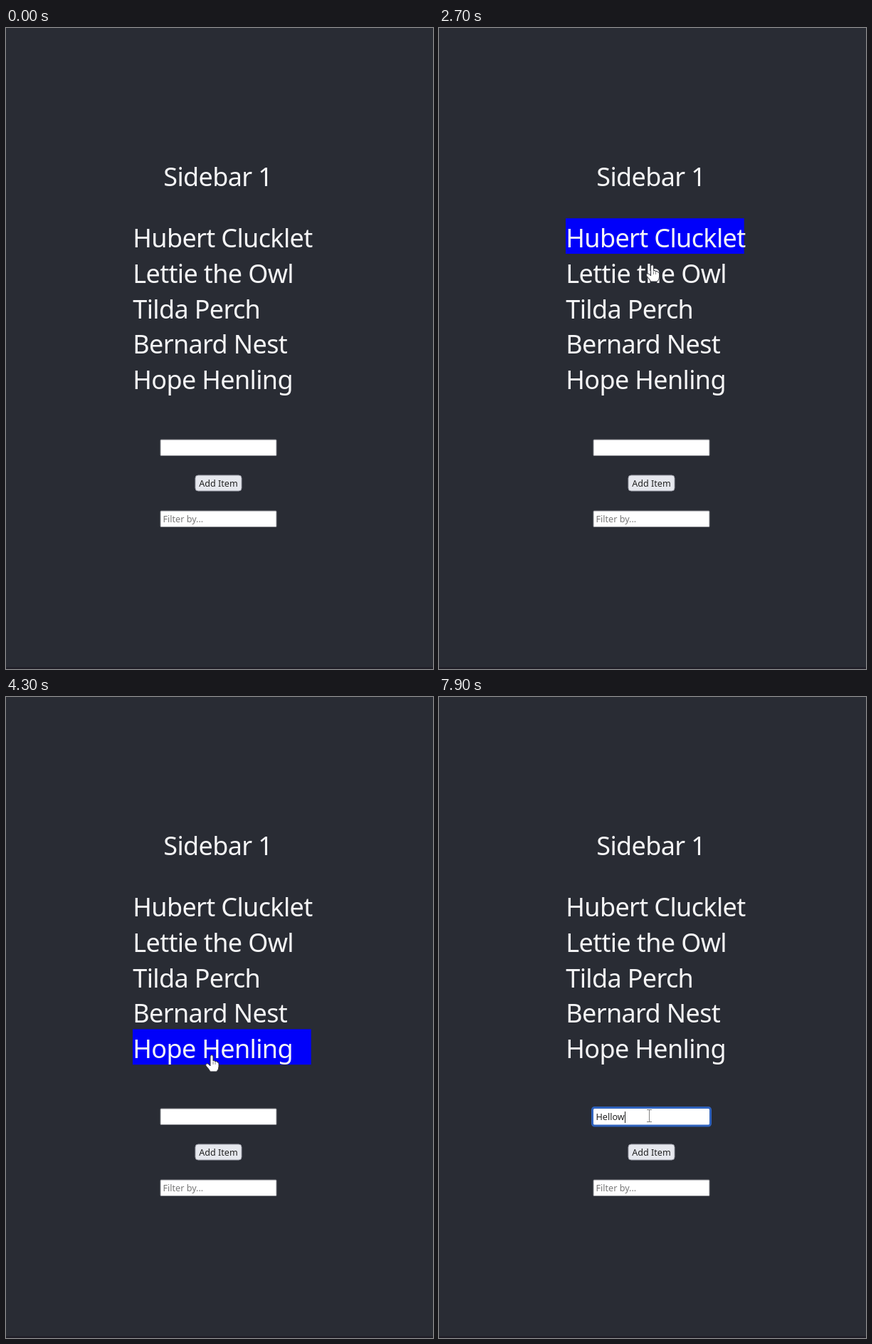
Write an HTML page with a canvas that moves like this. It is 600 by 900 pixels and loops after 8000 ms.

```html
<!DOCTYPE html>
<html lang="en">
<head>
<meta charset="utf-8">
<title>Sidebar</title>
<style>
  html, body { margin: 0; width: 100%; height: 100%; overflow: hidden; background: #292c34; }
  canvas { display: block; width: 600px; height: 900px; }
</style>
</head>
<body>
<canvas id="stage" width="600" height="900"></canvas>
<script>
const ctx = document.getElementById('stage').getContext('2d');
const LOOP = 8000, STEP = 100;
const FAMILY = '"Noto Sans", "Open Sans", sans-serif';
const NAMES = ['Hubert Clucklet', 'Lettie the Owl', 'Tilda Perch', 'Bernard Nest', 'Hope Henling'];
const LIST = { x: 178, y: 267.2, w: 250.7, row: 49.8 };
const FIELD = { x: 216.5, y: 577.5, w: 164, h: 23.5 };
const FOCUS_AT = 4900;
const WORD = 'Hellow', TYPE_AT = 6200, KEY_TIME = 260;

// turning points of the pointer: time, x, y
const PATH = [
  [1900, 20, 395], [2200, 258, 306], [2500, 300, 292], [3200, 298, 510],
  [3750, 313, 328], [4300, 289, 503], [4550, 287, 612], [4900, 285, 592],
  [6100, 285, 592], [6500, 296, 588]
];

const ease = k => (1 - Math.cos(Math.PI * k)) / 2;

function pointer(t) {
  if (t < PATH[0][0]) return null;
  const i = PATH.findIndex(p => p[0] > t);
  const [t1, x1, y1] = PATH.at(i);
  if (i < 0) return { x: x1, y: y1 };
  const [t0, x0, y0] = PATH[i - 1];
  const k = ease((t - t0) / (t1 - t0));
  return { x: x0 + (x1 - x0) * k, y: y0 + (y1 - y0) * k };
}

function rowAt(p) {
  if (!p || p.x < LIST.x || p.x > LIST.x + LIST.w) return -1;
  const i = Math.floor((p.y - LIST.y) / LIST.row);
  return i >= 0 && i < NAMES.length ? i : -1;
}

function inField(p) {
  return p.x > FIELD.x && p.x < FIELD.x + FIELD.w && p.y > FIELD.y && p.y < FIELD.y + FIELD.h;
}

function text(str, x, y, size, color, tracking = 0) {
  ctx.font = size + 'px ' + FAMILY;
  ctx.letterSpacing = tracking + 'px';
  ctx.fillStyle = color;
  ctx.fillText(str, x, y);
}

const bigText = (str, x, y) => text(str, x, y, 36, '#f5f5f6', -0.65);
const smallText = (str, y, color, x = 220.5) => text(str, x, y, 12.6, color);

function box(x, y, w, h, r, fill, stroke, line = 1) {
  ctx.beginPath();
  ctx.roundRect(x + line / 2, y + line / 2, w - line, h - line, r);
  ctx.fillStyle = fill;
  ctx.fill();
  ctx.strokeStyle = stroke;
  ctx.lineWidth = line;
  ctx.stroke();
}

function inputBox(y) {
  box(FIELD.x, y, FIELD.w, FIELD.h, 1, '#fff', '#85868c');
}

function shape(p, d, stroke) {
  const path = new Path2D(d);
  ctx.save();
  ctx.translate(p.x, p.y);
  ctx.lineWidth = 1;
  ctx.lineJoin = 'round';
  ctx.fillStyle = '#fff';
  ctx.strokeStyle = stroke;
  ctx.fill(path);
  ctx.stroke(path);
  ctx.restore();
}

function drawHand(p) {
  shape(p, 'M-2 1Q0-2 2 1V8Q4 6 5 9Q7 7 8 10Q10 9 10 12V16Q10 20 7 23H-2' +
    'Q-4 19-8 15Q-9 11-5 12L-2 15Z', '#30323a');
  ctx.fillStyle = '#55575e';
  for (const x of [2, 5]) ctx.fillRect(p.x + x - 0.3, p.y + 9, 0.7, 4);
}

function drawArrow(p) {
  shape(p, 'M0 0V17L4 13.5L7 20L9.5 19L6.7 12.5H12Z', '#222');
}

function drawBeam(p) {
  ctx.fillStyle = '#808080';
  const x = Math.round(p.x) - 1, y = Math.round(p.y) - 9;
  ctx.fillRect(x, y, 1, 18);
  for (const dy of [0, 17]) {
    ctx.fillRect(x - 3, y + dy, 3, 1);
    ctx.fillRect(x + 1, y + dy, 3, 1);
  }
}

function drawEntry(t) {
  if (t < FOCUS_AT) return inputBox(FIELD.y);
  box(FIELD.x - 2.5, FIELD.y - 2.5, FIELD.w + 5, FIELD.h + 5, 3, '#fff', '#2f62bd', 3);

  const typing = t - TYPE_AT;
  const count = Math.min(WORD.length, Math.max(0, Math.floor(typing / KEY_TIME) + 1));
  const typed = WORD.slice(0, count);
  smallText(typed, 593.7, '#222');

  // the caret restarts its blink with every key
  const since = count ? typing - (count - 1) * KEY_TIME : t - FOCUS_AT;
  if (since % 1000 < 500) {
    ctx.fillRect(Math.round(220.5 + ctx.measureText(typed).width), 582, 1, 16);
  }
}

function draw(t) {
  ctx.fillStyle = '#292c34';
  ctx.fillRect(0, 0, 600, 900);
  ctx.fillStyle = '#201f28';
  ctx.fillRect(0, 897.5, 600, 2.5);

  bigText('Sidebar 1', 221.3, 221.8);

  // the highlight trails the pointer by one step
  const hover = rowAt(pointer(t - STEP));
  if (hover >= 0) {
    ctx.fillStyle = '#0000fa';
    ctx.fillRect(LIST.x, LIST.y + hover * LIST.row, LIST.w, LIST.row);
  }
  NAMES.forEach((name, i) => bigText(name, 178.3, 308 + i * LIST.row));

  drawEntry(t);
  box(265.5, 627.5, 66, 23, 4, '#e6e8ee', '#9a9ca6');
  smallText('Add Item', 643.7, '#222', 271.2);
  inputBox(FIELD.y + 100);
  smallText('Filter by...', 693.7, '#777');

  const p = pointer(t);
  if (!p) return;
  if (inField(p)) drawBeam(p);
  else if (rowAt(p) >= 0) drawHand(p);
  else drawArrow(p);
}

const start = performance.now();
function tick() {
  const t = (performance.now() - start) % LOOP;
  draw(Math.floor(t / STEP) * STEP);
  requestAnimationFrame(tick);
}
tick();
</script>
</body>
</html>
```
